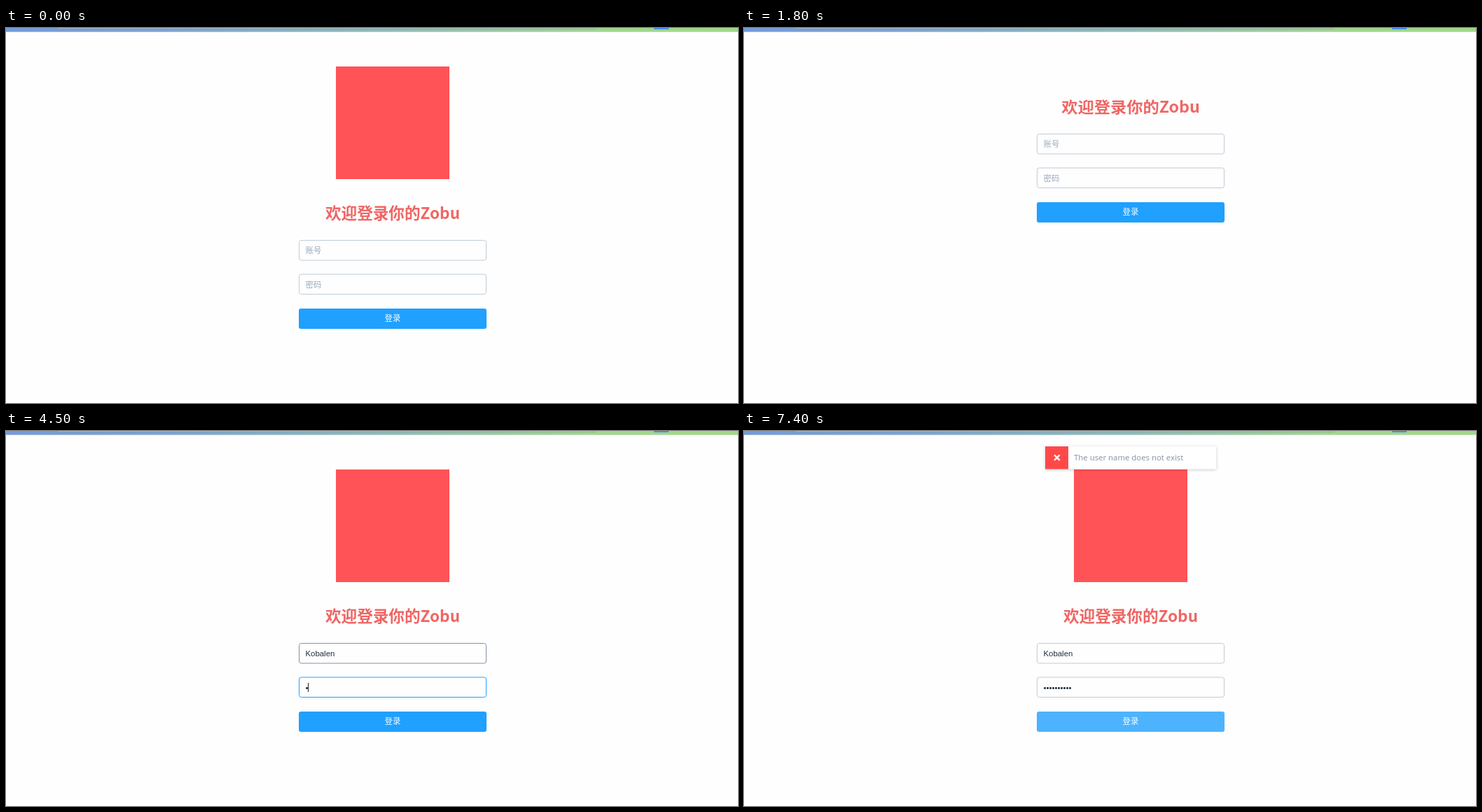
Write an HTML page that moves like this. It is 1045x536 px and loops after 8000 ms.

```html
<!DOCTYPE html>
<html lang="zh-CN">
<head>
<meta charset="utf-8">
<title>登录</title>
<style>
  html, body { margin: 0; width: 100%; height: 100%; overflow: hidden; background: #fefefe; }
  svg { display: block; width: 1045px; height: 536px; }
  text { font-family: "Open Sans", "Noto Sans CJK SC", "Noto Sans CJK", sans-serif; white-space: pre; }
  .heading { font: bold 22.6px "Noto Sans CJK SC", "Noto Sans CJK", sans-serif; fill: #ef6664; text-anchor: middle; }
  .field { font: 11.4px "Liberation Sans", "Noto Sans CJK SC", "Noto Sans CJK", sans-serif; fill: #1f2d3d; }
  .hint { fill: #97a8be; }
  .box { fill: #fefefe; }
  .caret { fill: #222; }
  #menu text { font-size: 9.75px; fill: #111; }
  #menu .dim { fill: #929292; }
  #menu .key { text-anchor: end; }
  #menuBox { filter: drop-shadow(2px 2px 1px rgba(0, 0, 0, .45)); }
  #toast rect:first-child { filter: drop-shadow(0 1.5px 2px rgba(0, 0, 0, .2)); }
</style>
</head>
<body>
<svg viewBox="0 0 1045 536">
  <defs>
    <linearGradient id="sky">
      <stop offset="0" stop-color="#749bd8"/>
      <stop offset=".22" stop-color="#7ba3d4"/>
      <stop offset=".55" stop-color="#8fbfb4"/>
      <stop offset=".8" stop-color="#9fd68d"/>
      <stop offset="1" stop-color="#a0d888"/>
    </linearGradient>
  </defs>
  <rect width="1045" height="536" fill="#fefefe"/>

  <rect id="logo" x="471" y="55" width="162" height="161" fill="#ff5357"/>
  <g id="form">
    <text class="heading" id="heading" x="552" y="273">欢迎登录你的Zobu</text>

    <rect class="box" id="userBox" x="418.5" y="303.5" width="267" height="28.5" rx="3"/>
    <text class="field" id="user" x="427.5" y="322"></text>
    <rect class="caret" id="userCaret" y="311" width="1" height="13"/>

    <rect class="box" id="passBox" x="418.5" y="352" width="267" height="28.5" rx="3"/>
    <text class="field" id="pass" x="427.5" y="370.5"></text>
    <rect class="caret" id="passCaret" y="360" width="1" height="13"/>

    <rect id="button" x="418" y="401" width="268" height="29" rx="3"/>
    <text x="552" y="419.3" font-size="11.4" fill="#fff" text-anchor="middle">登录</text>
  </g>

  <g id="menu">
    <rect id="menuBox" x="773.5" y="186.5" width="234" height="235.5" fill="#fff" stroke="#b4b4b4"/>
    <rect id="hover" x="774" width="233" height="18.5" fill="#ebebeb"/>
    <path d="M774 248.5H1007M774 332H1007M774 378.5H1007" stroke="#e3e3e3"/>
    <rect x="781.5" y="340" width="13" height="13" fill="#3a73a8"/>
    <circle cx="788" cy="365" r="6.5" fill="#55d6a4"/>
    <path d="M997 343.5l4 3.2-4 3.2zM997 362l4 3.2-4 3.2z" fill="#333"/>
  </g>

  <g id="ime">
    <rect x="966.5" y="402.5" width="90" height="19" fill="#fff" stroke="#b5c9da"/>
    <rect x="957" y="401" width="21" height="20" fill="#f5551f"/>
    <text x="983" y="416.4" font-size="12" font-weight="bold" fill="#1b70c0">英</text>
    <path d="M1008.5 406.5A5.4 5.4 0 1 1 1002 414.2A6 6 0 0 0 1008.5 406.5Z" fill="#1b70c0"/>
    <circle cx="1021.8" cy="410" r="1.6" fill="#1b70c0"/>
    <path d="M1025.5 411h2.4v2.3l-1.6 2.7h-1.2l.9-2.6h-.5z" fill="#1b70c0"/>
    <rect x="1036.5" y="407.5" width="14" height="9" rx="1" fill="none" stroke="#1b70c0"/>
    <path d="M1038 410.5H1045M1038 412.5H1045M1040 414.5H1045" stroke="#1b70c0" stroke-dasharray="1.5 1"/>
  </g>

  <g id="toast">
    <rect x="430" y="22" width="244" height="32.5" rx="1.5" fill="#fff"/>
    <rect x="430" y="22" width="33" height="32.5" fill="#ff4949"/>
    <path d="M443 34.3l7.6 7.6M450.6 34.3l-7.6 7.6" stroke="#fff" stroke-width="2.3"/>
    <text x="471" y="42.2" font-size="11.4" fill="#8391a5">The user name does not exist</text>
  </g>

  <rect width="1045" height="5.6" fill="url(#sky)"/>
  <path d="M74 0H843V.5H74z" fill="#fff"/>
  <path d="M74 1H843" stroke="#7f8d98" stroke-width=".8"/>
  <rect x="925" width="21" height="1.8" fill="#4285f4"/>
</svg>
<script>
const LOOP = 8000, STEP = 100;
const $ = id => document.getElementById(id);
const clamp = v => Math.max(0, Math.min(1, v));
const lerp = (a, b, k) => a + (b - a) * k;
const within = (t, a, b) => t >= a && t < b;
const show = (id, on) => $(id).setAttribute('visibility', on ? 'visible' : 'hidden');

function bezier(x1, y1, x2, y2) {
  const at = (a, b, s) => 3 * a * s * (1 - s) ** 2 + 3 * b * s * s * (1 - s) + s ** 3;
  return x => {
    let lo = 0, hi = 1;
    for (let i = 0; i < 24; i++) {
      const mid = (lo + hi) / 2;
      if (at(x1, x2, mid) < x) lo = mid; else hi = mid;
    }
    return at(y1, y2, lo);
  };
}
const ease = bezier(.25, .1, .25, 1);
const easeBorder = bezier(.645, .045, .355, 1);

// Context menu rows: centre, label, shortcut, disabled
const ROWS = [
  [198, '返回(B)', 'Alt+向左箭头'],
  [217, '前进(F)', 'Alt+向右箭头', true],
  [235.5, '重新加载(R)', 'Ctrl+R'],
  [263, '另存为(A)...', 'Ctrl+S'],
  [282, '打印(P)...', 'Ctrl+P'],
  [300.5, '投射(C)...'],
  [319, '翻成中文（简体）(T)'],
  [346.5, '捕捉网页截图 - MistClip的'],
  [365.3, 'Redux DevTools'],
  [393, '查看网页源代码(V)', 'Ctrl+U'],
  [411.5, '检查(N)', 'Ctrl+Shift+I']
];

function addText(x, y, str, cls) {
  const el = document.createElementNS('http://www.w3.org/2000/svg', 'text');
  el.setAttribute('x', x);
  el.setAttribute('y', y + 3.6);
  el.setAttribute('class', cls);
  el.textContent = str;
  $('menu').append(el);
  return el;
}
const keys = ROWS.map(([y, label, key, off]) => {
  addText(802, y, label, off ? 'dim' : '');
  return key && addText(987, y, key, 'key dim');
});

// Heading wobble: progress, x scale, y scale
const WOBBLE = [[0, 1, 1], [.3, 1.25, .75], [.4, .75, 1.25], [.5, 1.15, .85],
  [.65, .95, 1.05], [.75, 1.05, .95], [1, 1, 1]];
const FIRST_LOAD = 466, RELOAD = 1766;

function wobble(p) {
  if (p <= 0 || p >= 1) return [1, 1];
  const i = WOBBLE.findIndex(k => k[0] > p);
  const a = WOBBLE[i - 1], b = WOBBLE[i];
  const k = ease((p - a[0]) / (b[0] - a[0]));
  return [lerp(a[1], b[1], k), lerp(a[2], b[2], k)];
}

const IDLE = [191, 203, 217], OVER = [131, 145, 165], FOCUS = [32, 160, 255];
const USER_BORDER = [[2000, OVER], [2270, FOCUS], [4080, OVER], [6380, IDLE]];
const PASS_BORDER = [[4080, FOCUS], [6880, IDLE]];

function border(id, changes, t) {
  let color = IDLE;
  for (const [start, next] of changes) {
    if (t < start) break;
    const k = easeBorder(clamp((t - start) / 200));
    color = color.map((c, i) => lerp(c, next[i], k));
  }
  $(id).setAttribute('stroke', `rgb(${color.map(Math.round)})`);
}

const NAME = 'Kobalen';
const NAME_START = 3000, NAME_END = 3800;
const PASS_KEYS = [4500, 4600, 4800, 4900, 5100, 5300, 5600, 5700, 5800, 6000];

function field(id, value, hint, caretOn) {
  const el = $(id), caret = id + 'Caret';
  const str = value || hint;
  if (el.textContent !== str) el.textContent = str;
  el.setAttribute('class', value ? 'field' : 'field hint');
  const w = value ? el.getComputedTextLength() : 0;
  $(caret).setAttribute('x', Math.round(427.3 + w));
  show(caret, caretOn);
}

function typedName(t) {
  if (t < NAME_START) return '';
  const k = clamp((t - NAME_START) / (NAME_END - NAME_START));
  return NAME.slice(0, 1 + Math.round(k * (NAME.length - 1)));
}

function drawMenu(t) {
  const open = within(t, 1000, 1700);
  const row = t >= 1400 ? 2 : within(t, 1200, 1300) ? 0 : -1;
  show('menu', open);
  show('hover', open && row >= 0);
  if (row >= 0) $('hover').setAttribute('y', ROWS[row][0] - 9.5);
  keys.forEach((el, i) => el && el.setAttribute('class', i === row ? 'key' : 'key dim'));
}

function draw(t) {
  // The form sits higher until the logo has loaded
  const logoReady = !within(t, RELOAD, RELOAD + STEP);
  show('logo', logoReady);
  $('form').setAttribute('transform', `translate(0 ${logoReady ? 0 : -152})`);

  const [sx, sy] = wobble((t - (t < RELOAD ? FIRST_LOAD : RELOAD)) / 1000);
  $('heading').setAttribute('transform', `translate(552 265) scale(${sx} ${sy}) translate(-552 -265)`);

  drawMenu(t);
  show('ime', within(t, 2300, 4200));

  border('userBox', USER_BORDER, t);
  border('passBox', PASS_BORDER, t);
  field('user', typedName(t), '账号', within(t, 2300, 2800) || within(t, NAME_START, 4100));
  field('pass', '•'.repeat(PASS_KEYS.filter(k => k <= t).length), '密码', within(t, 4100, 6500));

  const fill = t < 6800 ? '#20a0ff' : within(t, 6900, 7000) ? '#1d90e6' : '#4db3ff';
  $('button').setAttribute('fill', fill);

  const dt = t - 7000;
  $('toast').setAttribute('transform', `translate(0 ${-32.5 * (1 - ease(clamp(dt / 400)))})`);
  $('toast').setAttribute('opacity', dt > 0 ? ease(clamp(dt / 300)) : 0);
}

const t0 = performance.now();
function tick() {
  const t = (performance.now() - t0) % LOOP;
  draw(Math.floor(t / STEP) * STEP);
  requestAnimationFrame(tick);
}
tick();
</script>
</body>
</html>
```
